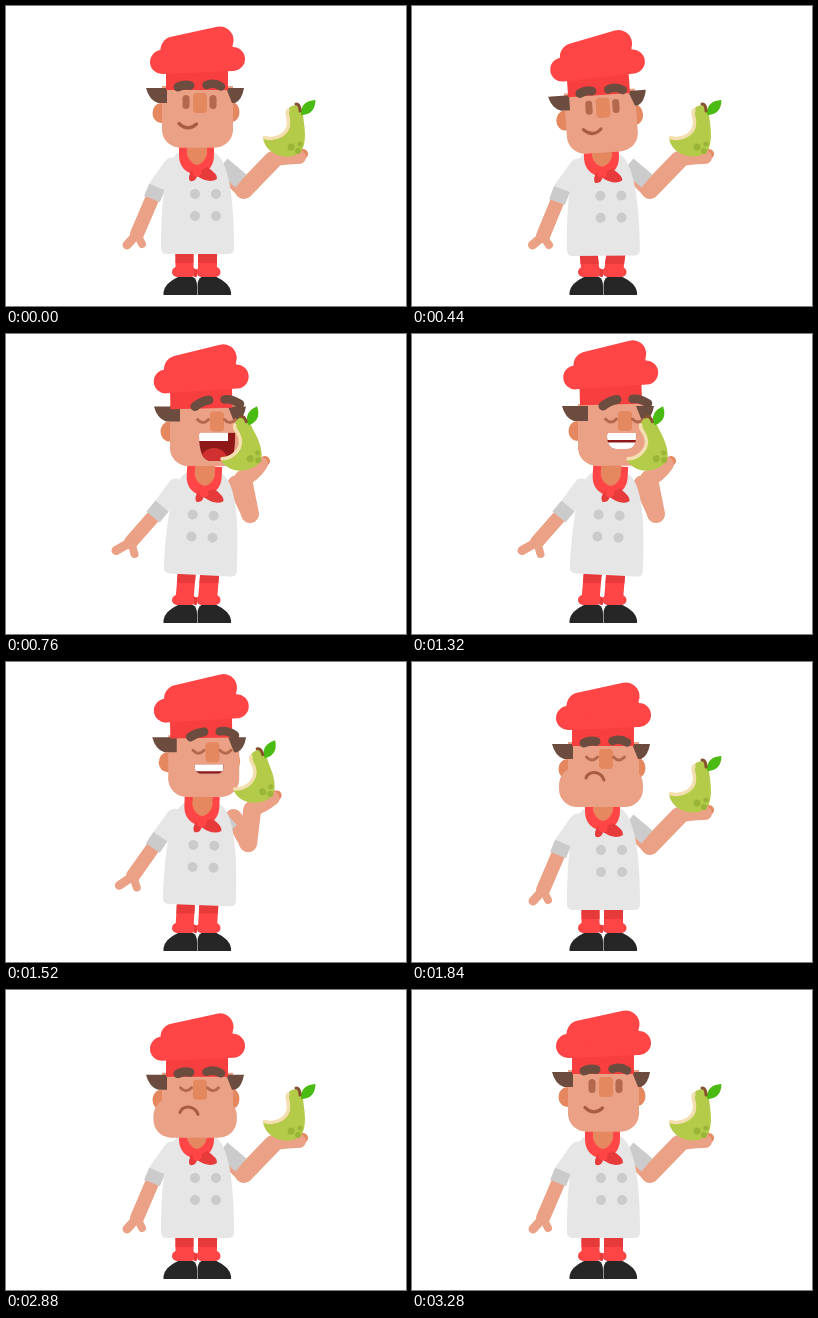
Recreate the animation shown at these times as an HTML page. Size 400 px wide and 300 px high, loop 3.32 s.

```html
<!DOCTYPE html>
<html>
<head>
<meta charset="utf-8">
<style>
html, body { margin: 0; width: 100%; height: 100%; overflow: hidden; background: #fff; }
svg { display: block; width: 400px; height: 300px; }
</style>
</head>
<body>
<svg id="stage" viewBox="0 0 400 300"></svg>
<script>
const LOOP = 3320;
const SKIN = '#eba186', SKIN_DARK = '#e5875f', LINE = '#b5694c', RED = '#ff4545', RED_DARK = '#e73b3b',
  HAIR = '#6b4c3e', COAT = '#e6e6e6', CUFF = '#cbcbcb', BLACK = '#262626';
const stage = document.getElementById('stage');

const ramp = (t, a, b) => {
  const x = Math.min(1, Math.max(0, (t - a) / (b - a)));
  return x * x * (3 - 2 * x);
};
const pulse = (t, a, b, c, d) => ramp(t, a, b) - ramp(t, c, d);
const path = (d, fill) => `<path d="${d}" fill="${fill}"/>`;
const stroke = (d, color, w, cap = 'round') =>
  `<path d="${d}" fill="none" stroke="${color}" stroke-width="${w}" stroke-linecap="${cap}" stroke-linejoin="round"/>`;
const dot = (x, y, r, fill) => `<circle cx="${x}" cy="${y}" r="${r}" fill="${fill}"/>`;
const oval = (x, y, rx, ry, fill) => `<ellipse cx="${x}" cy="${y}" rx="${rx}" ry="${ry}" fill="${fill}"/>`;
const rect = (x, y, w, h, r, fill) =>
  `<rect x="${x}" y="${y}" width="${w}" height="${h}" rx="${r}" fill="${fill}"/>`;
const group = (transform, inner) => `<g transform="${transform}">${inner}</g>`;

function legs(mix) {
  const shade = mix(257, 258, 249);
  const leg = (x, w, hip, cuffX) => {
    const k = (266 - shade) / 30;
    return path(`M${x + hip},236h${w}L${x + w},266H${x}Z`, RED) +
      path(`M${x + hip},236h${w}L${x + w + hip * k},${shade}h${-w}Z`, RED_DARK) +
      rect(cuffX, 261, 24, 10, 5, RED);
  };
  const shoe = 'M157.5,289V286Q159,277 172,271H187Q191,273 191,280V289Z';
  return leg(169.5, 18, mix(0, -3, 2.5), 166) + leg(192, 19, mix(0, 4, 2.5), 190.5) +
    rect(188, 263, 3, 8, 1, RED_DARK) + path(shoe, BLACK) + group('translate(382.5 0) scale(-1 1)', path(shoe, BLACK));
}

function leftArm(mix) {
  const pt = (a, b, c) => `${mix(a[0], b[0], c[0])},${mix(a[1], b[1], c[1])}`;
  const shoulder = pt([166, 160], [166, 161], [170, 153]);
  const cuff = pt([151, 181], [150, 183], [156, 172]);
  const elbow = pt([146, 193], [145, 196], [147, 183]);
  const wrist = pt([131, 228], [131, 230], [125, 208]);
  const finger = pt([121, 239], [120.5, 239], [110, 216.5]);
  const thumb = pt([136, 238], [137, 239], [128.5, 220]);
  return stroke(`M${elbow}L${wrist}`, SKIN, 14) +
    stroke(`M${wrist}L${finger}`, SKIN, 9) + stroke(`M${wrist}L${thumb}`, SKIN, 8) +
    stroke(`M${shoulder}L${cuff}`, COAT, 17) +
    stroke(`M${cuff}L${elbow}`, CUFF, 17, 'butt');
}

function rightArm(mix) {
  const elbow = `${mix(238, 238, 244)},${mix(184, 184, 180)}`;
  const wx = mix(267, 267, 237), wy = mix(154, 154, 145);
  const hx = mix(297, 297, 259), hy = mix(148, 148, 127);
  return stroke(`M${mix(222, 222, 230)},${mix(168, 168, 150)}L${elbow}`, SKIN, 17) +
    stroke(`M${elbow}L${wx},${wy}`, SKIN, 18) +
    stroke(`M${mix(216, 216, 212)},${mix(159, 159, 155)}L${mix(235, 235, 220)},${mix(175, 175, 166)}`, CUFF, 17, 'butt') +
    stroke(`M${hx - 4},${hy + 1}L${hx},${hy}`, SKIN_DARK, 10) +
    stroke(`M${wx},${wy}Q${wx + 10},${wy - 3} ${hx - 4},${hy + 3}`, SKIN, 14);
}

function pear(mix) {
  const fruit =
    path('M283,102C288,97 297,99 297,108C298,120 301,130 297,142C293,151 281,152 272,149C263,146 258,139 257,132C270,136 284,128 283.5,116C283.5,110 280,108 283,102Z', '#b3cb49') +
    stroke('M258.5,131.5C270,135 283,128 282.5,116C282.5,110 279.5,108 282,104', '#f4dfb0', 3.5) +
    dot(285, 141, 3.5, '#99b638') + dot(294, 138, 2.5, '#99b638') + dot(292, 145, 3, '#99b638') +
    path('M295,109Q294,95 309.5,94Q309,109 295,109Z', '#4abb12') +
    stroke('M294,105Q294,98 290,98', '#86512f', 3);
  return group(`translate(${mix(0, 0, -42)} ${mix(0, 0, -15)}) rotate(${mix(0, 0, -20)} 282 137)`, fruit);
}

function body(mix) {
  let s = path('M176,145C161,148 155,185 155,242Q155,248 161,248H222Q228,248 228,242C228,185 221,148 205,145Z', COAT);
  for (const x of [189, 210]) for (const y of [188, 210]) s += dot(x + mix(0, 0, -8), y, 5, CUFF);
  s += path('M173,139H208V149C208,163 198,168 191,169C183,168 173,163 173,149Z', RED) +
    path('M181,136H201V148Q199,157 191,159Q183,157 181,148Z', SKIN_DARK) +
    path('M191,166L201,161Q212,168 211,173Q203,178 191,170Q190,176 184,175Q181,171 186,164Z', RED_DARK) +
    dot(191, 166, 4.5, RED);
  return group(`translate(${mix(0, 0, 2.5)} ${mix(0, 1.8, -7)}) rotate(${mix(0, -0.6, 3)} 191 248)`, s);
}

function hat() {
  return rect(160, 60, 62, 24, 0, '#f73f3f') +
    stroke('M156,56L227,53', RED, 24) + stroke('M168,44L214,34', RED, 27) +
    path('M157,40L226,38L229,50L150,56Z', RED);
}

function hair(mix) {
  const side = mix(161, 161, 166);
  return path(`M140,82H${side}V97H152Q143,94 140,82Z`, HAIR) +
    group(`translate(${mix(0, 0, -6)} 0)`, path('M220,82H238Q236,94 229,97H226Z', HAIR));
}

function eyes(closed) {
  return [180, 207].map(x => closed < 0.6
    ? rect(x - 3.5, 89 + 6 * closed, 7, 14 * (1 - closed), 3.5, LINE)
    : stroke(`M${x - 5.5},95Q${x},${95 + 6 * closed} ${x + 5.5},95`, LINE, 3)).join('');
}

function mouth(t, chew) {
  if (t < 580 || t > 2960) return stroke('M173,117.5Q182,126 190.5,118', '#a85c40', 3.2);
  if (t > 1560) {
    const y = 2 * chew;
    return stroke(`M174,${118 + y}Q176,${112 + y} 183,${112.5 + y}Q190,${113.5 + y} 192,${120 + y}`, '#a85c40', 3);
  }
  const open = pulse(t, 560, 720, 840, 1180);
  const h = (16 + 12.5 * open) * pulse(t, 540, 640, 1480, 1580);
  const y = 109 - open, right = 205 + 7 * open;
  const shape = `M177,${y}H${right}Q${right + 1},${y + h} ${right - 9},${y + h}H${186 + 2 * open}Q176,${y + h} 176,${y + 2}Z`;
  return `<clipPath id="lips"><path d="${shape}"/></clipPath><g clip-path="url(#lips)">` +
    rect(170, y, 50, 32, 0, '#8f1919') +
    oval(191, y + h + 1, 14, 14 * open, '#d03030') +
    rect(170, y - 1, 35, 8 + 1.5 * open, 0, '#fff') +
    (open < 0.5 ? rect(170, y + 9.5 + 15 * open, 50, 9, 0, '#fff') : '') + '</g>';
}

function head(t, mix) {
  const chew = -Math.cos((t - 1840) / 400 * 2 * Math.PI);
  const puff = pulse(t, 1560, 1760, 2860, 3020);
  const bob = puff * (1 - Math.cos((t - 1840) / 320 * 2 * Math.PI)) + 3 * pulse(t, 2800, 2940, 3000, 3180);
  const lift = pulse(t, 760, 1320, 1400, 1600);
  const closed = pulse(t, 520, 640, 2940, 3060);
  const brow = mix(0, 0, 1);
  const chin = 141.5 + 3.5 * puff;
  const face =
    oval(155, 107, 8.5, 10, SKIN_DARK) + oval(226 - 8 * brow, 106, 7.5, 10, SKIN_DARK) +
    path('M156,80H227V119Q227,141.5 205,141.5H178Q156,141.5 156,119Z', SKIN) +
    rect(156 - 9 * puff, 106 - puff, 71 + 13 * puff, chin - 106 + puff, 18, SKIN);
  const features =
    rect(187, 87, 14, 20, 4, '#e3885f') + eyes(closed) +
    stroke(`M172,${81 + brow}Q178,${78 - brow} ${184 + 2 * brow},${79.5 - 4 * brow}`, HAIR, 9) +
    stroke(`M${200.5 + brow},${79 - 4 * brow}Q208,${76 - 2 * brow} ${215 + 2 * brow},${80.5 - brow}`, HAIR, 8.5) +
    mouth(t, chew);
  return group(`translate(${mix(0, 0, 8) + 2 * lift} ${mix(0, 5, -9.5) + bob - lift / 2}) rotate(${mix(0, -4, 0)} 190 140)`,
    face + hair(mix) +
    group(`translate(${mix(0, 0, -3.5) + 1.5 * lift} ${-3.5 * lift}) rotate(${mix(0, 0, -1.5)} 190 84)`, hat()) +
    group(`translate(${mix(0, 0, 9)} 0)`, features));
}

function draw(now) {
  const t = now % LOOP;
  const bite = pulse(t, 460, 720, 1400, 1730);
  const crouch = ramp(t, 40, 400) * (1 - ramp(t, 460, 720));
  // Blend of the resting, crouching and biting poses
  const mix = (rest, low, up) => +(rest + (low - rest) * crouch + (up - rest) * bite).toFixed(2);
  stage.innerHTML = legs(mix) + leftArm(mix) + rightArm(mix) + body(mix) + head(t, mix) + pear(mix);
}

const start = performance.now();
function tick() {
  draw(performance.now() - start);
  requestAnimationFrame(tick);
}
tick();
</script>
</body>
</html>
```
